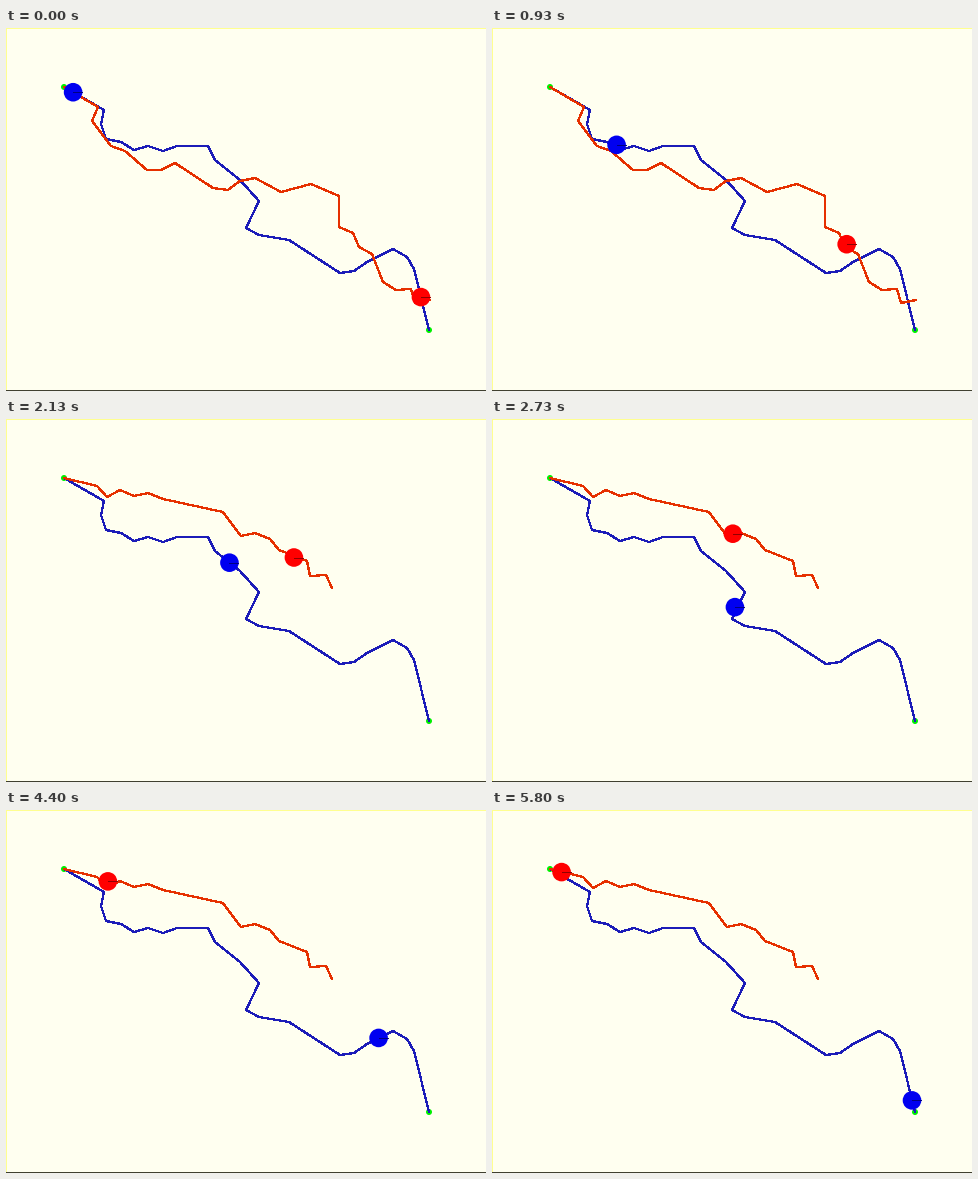
A matplotlib script for the animation above (6.4 s loop, 480 by 363 pixels).

```python
import math

import matplotlib.pyplot as plt
from matplotlib.animation import FuncAnimation
from matplotlib.patches import Circle, Rectangle

W, H, DPI = 480, 363, 96
PX = 72 / DPI              # one pixel in points
LOOP, INTERVAL = 6400, 20  # ms
STEP_MS = 200 / 3
LAST = 87                  # last simulation step, held until the loop ends
REPLAN = 24                # step at which the red agent gets a new route
BRANCH = 15                # spacing of the waypoints along a route
SPEED, REACH, STOP = 6.0, 12.5, 12.0

START, GOAL = (58, 59), (423, 302)

# Only the real turns; the waypoints between them are computed.
BLUE_ROUTE = [
    START, (98, 82), (95, 96), (100, 111), (115, 114), (128, 122),
    (142, 118), (157, 123), (171, 118), (202, 118), (209, 132), (234, 152),
    (253, 173), (240, 200), (253, 207), (283, 212), (334, 245), (348, 243),
    (361, 234), (387, 221), (401, 229), (408, 241), GOAL,
]
RED_ROUTE = [
    (424, 272), (409, 275), (405, 261), (390, 262), (377, 254), (366, 226),
    (353, 219), (347, 205), (333, 199), (333, 168), (305, 156), (275, 164),
    (249, 150), (234, 153), (222, 162), (207, 160), (169, 135), (155, 142),
    (141, 142), (119, 123), (105, 118), (86, 93), (92, 79), START,
]
RED_DETOUR = [
    (326, 169), (320, 156), (304, 157), (301, 142), (273, 131), (264, 120),
    (249, 114), (235, 117), (217, 93), (157, 80), (142, 74), (128, 77),
    (114, 71), (101, 78), (91, 67), START,
]


def waypoints(route):
    """Cut each straight piece into branches of about equal length."""
    points = [route[0]]
    for (x0, y0), (x1, y1) in zip(route, route[1:]):
        n = max(1, round(math.hypot(x1 - x0, y1 - y0) / BRANCH))
        points += [(x0 + (x1 - x0) * i / n, y0 + (y1 - y0) * i / n)
                   for i in range(1, n + 1)]
    return points


def follow(route, lead, steps):
    """Move by `lead`, then chase the waypoints, turning early to the next."""
    points = waypoints(route)
    last = len(points) - 1
    x, y = points[0]
    target = 1
    trail = []
    for move in [lead] + [SPEED] * steps:
        dx, dy = points[target][0] - x, points[target][1] - y
        if math.hypot(dx, dy) < REACH and target < last:
            target += 1
            dx, dy = points[target][0] - x, points[target][1] - y
        d = math.hypot(dx, dy)
        if target == last:
            move = max(0, min(move, d - STOP))
        x += dx / d * move
        y += dy / d * move
        trail.append((x, y))
    return trail


# Both agents have already set off when the loop opens.
blue_trail = follow(BLUE_ROUTE, 4.5, LAST + 1)[1:]
red_trail = (follow(RED_ROUTE, 4.5, REPLAN)[1:]
             + follow(RED_DETOUR, 2, LAST - REPLAN))

fig = plt.figure(figsize=(W / DPI, H / DPI), dpi=DPI, facecolor="#fffff0")
ax = fig.add_axes([0, 0, 1, 1])
ax.set_xlim(0, W)
ax.set_ylim(H, 0)
ax.axis("off")


def line(points, color, width, z):
    xs, ys = zip(*points)
    return ax.plot(xs, ys, color=color, lw=width * PX, zorder=z,
                   antialiased=False)[0]


def disc(center, radius, color, z):
    return ax.add_patch(Circle(center, radius, fc=color, ec="none", zorder=z))


def bar(x, y, w, h, color):
    ax.add_patch(Rectangle((x, y), w, h, fc=color, ec="none", zorder=0))


bar(0, 0, W, 1, "#ffff90")
bar(0, 0, 1, H, "#ffff90")
bar(0, H - 1, W, 1, "#404030")
for spot in (START, GOAL):
    disc(spot, 3, "#00f000", 1)
line(BLUE_ROUTE, "#1c1cb8", 1.2, 2)
red_line = line(RED_ROUTE, "#e63000", 1.2, 3)

blue_ball = disc(blue_trail[0], 9.3, "#0000f0", 4)
red_ball = disc(red_trail[0], 9.3, "#ff0000", 4)
blue_mark = line([(0, 0), (1, 0)], "#000080", 1, 5)
red_mark = line([(0, 0), (1, 0)], "#900000", 1, 5)


def place(ball, mark, pos):
    x, y = pos
    ball.center = pos
    mark.set_data([x, x + 9], [y, y])


def draw(i):
    # Steps fall on times rounded to 10 ms.
    t = i * INTERVAL + 10
    k = min(LAST, int((t + 5) / STEP_MS))
    place(blue_ball, blue_mark, blue_trail[k])
    place(red_ball, red_mark, red_trail[k])
    route = RED_ROUTE if k < REPLAN else RED_DETOUR
    red_line.set_data(*zip(*route))
    return blue_ball, red_ball, blue_mark, red_mark, red_line


anim = FuncAnimation(fig, draw, frames=LOOP // INTERVAL, interval=INTERVAL,
                     repeat=True, repeat_delay=0)
plt.show()
```
